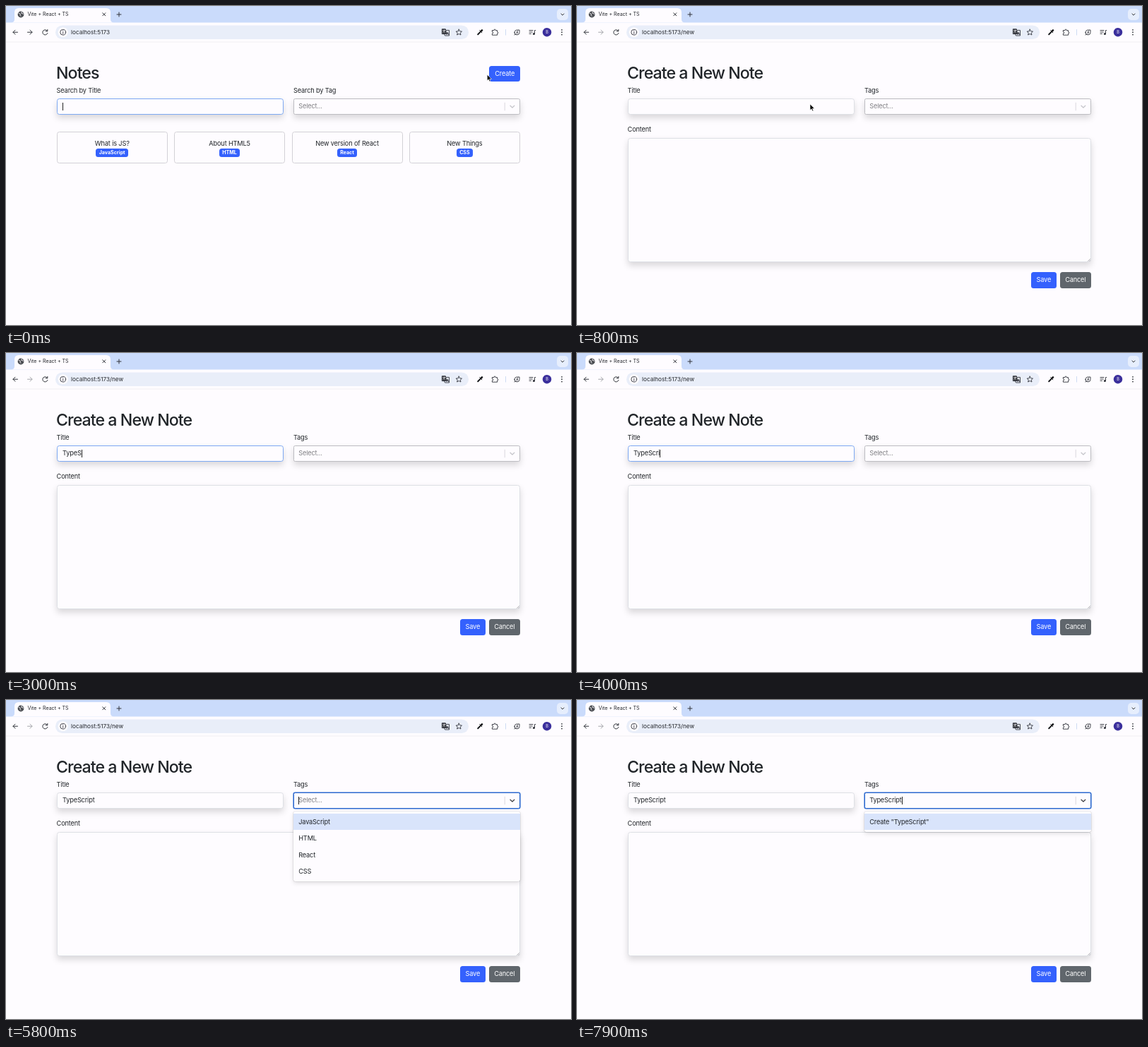
Animation, 800 px wide and 452 px high, one loop 8000 ms. Source, as an HTML page:

```html
<!DOCTYPE html>
<html lang="en">
<head>
<meta charset="utf-8">
<title>Notes</title>
<style>
html, body { margin: 0; width: 100%; height: 100%; overflow: hidden; background: #fefcff; }
body, svg text { font: 9.2px/12px Inter, "Open Sans", sans-serif; font-optical-sizing: none; }
body { color: #212529; letter-spacing: -.155px; }
#stage { position: relative; width: 800px; height: 452px; overflow: hidden; }
#stage > *, .page > * { position: absolute; box-sizing: border-box; }
.page { inset: 0; }
svg text { letter-spacing: 0; }
.t { white-space: pre; }
h1 { margin: 0; left: 71px; top: 80.5px; font-size: 23.2px; line-height: 28px; font-weight: 500; letter-spacing: -.95px; white-space: pre; }
.box { background: #fefcff; border: .6px solid #dee0e5; border-radius: 3.5px; box-shadow: 0 4.7px 9.4px rgba(0,0,0,.15); }
.field { top: 131.3px; height: 22.4px; display: flex; align-items: center; white-space: pre; }
#title { left: 72px; width: 320.8px; padding-left: 7px; }
#title.on { border-color: #7ea9f3; }
#select { left: 407.2px; width: 320.8px; padding-left: 6px; border-color: #bdbdc2; border-radius: 2.4px; }
#select.on { border-color: #2c69cf; box-shadow: 0 0 0 .6px #2c69cf; }
#hint { color: #808084; }
.field i { width: .8px; height: 11px; margin-right: -.8px; background: #222; }
#menu { left: 407.2px; top: 158.2px; width: 320.8px; padding: 2.4px 0; background: #fefcff; border-radius: 2.4px;
  box-shadow: 0 0 0 .6px rgba(0,0,0,.12), 0 2.4px 6.5px rgba(0,0,0,.12); }
#menu div { height: 23.55px; line-height: 23.55px; padding-left: 7px; white-space: pre; }
#menu div:first-child { background: #d9e4fb; }
.btn { height: 22.4px; line-height: 22.4px; border-radius: 3.5px; background: #3461fd; color: #fff; text-align: center; }
.card { top: 177.7px; width: 157px; height: 45px; border: .6px solid #d2d1d6; border-radius: 3.5px; text-align: center; padding-top: 10.5px; }
.card b { display: table; margin: 1px auto 0; padding: 0 4.6px; border-radius: 3.5px; background: #3461fd; color: #fff; font-size: 7.05px; letter-spacing: 0; }
#status { left: -1px; top: 440px; width: 72.5px; height: 13px; padding-left: 4px; background: #cadbfb; border-radius: 0 3px 0 0;
  border: .5px solid #b4c4e2; font-size: 7.05px; letter-spacing: 0; }
</style>
</head>
<body>
<div id="stage">
  <svg width="800" height="452" fill="none" stroke="#30333a" stroke-linecap="round" stroke-linejoin="round">
    <g stroke="none">
      <path fill="#cadbfb" d="M0 0H800V23.5H0Z"/>
      <path fill="#fefcff" d="M7 23.5Q12 23.5 12 18.5V9Q12 3 18 3H142Q148 3 148 9V18.5Q148 23.5 153 23.5Z"/>
      <path fill="#e3e2e7" d="M0 50.7H800V51.3H0Z"/>
      <rect x="70" y="27.5" width="585" height="19.5" rx="9.75" fill="#e9eef9"/>
      <circle cx="80.7" cy="37.2" r="7" fill="#fefcff"/>
      <rect x="780" y="4" width="16" height="16" rx="5" fill="#e6eefd"/>
      <circle cx="21" cy="12" r="4.4" fill="#4a4d52"/>
      <circle cx="766" cy="37.2" r="6.2" fill="#3b2f9c"/>
      <g fill="#30333a">
        <circle cx="787" cy="33.8" r=".9"/><circle cx="787" cy="37.2" r=".9"/><circle cx="787" cy="40.6" r=".9"/>
        <circle cx="80.7" cy="35.1" r=".6"/><circle cx="747.4" cy="39.6" r="1.5"/>
      </g>
      <path fill="#c3d3f0" d="M707.2 33H708V41.5H707.2Z"/>
      <text x="30.5" y="14.4" fill="#24272c" style="font-size:7.05px">Vite + React + TS</text>
      <text id="url" x="92" y="40.2" fill="#24272c" style="font-size:8.2px"></text>
      <text x="766" y="39.3" fill="#fff" text-anchor="middle" style="font-size:5.6px">B</text>
    </g>
    <path stroke="#fefcff" stroke-width=".9" d="M18 10.2l2.4 1.2 -.6 1.6 1.2 1.4M22.2 8.4l-.4 1.8 2.6 1"/>
    <path d="M136.8 9.8l4 4m0-4l-4 4M160 9v6m-3-3h6M785.9 11l2.1 2.1 2.1-2.1"/>
    <path d="M16.5 37.2H10m3-3l-3 3 3 3"/>
    <path id="forward" d="M30.5 37.2H37m-3-3l3 3-3 3"/>
    <path d="M58.5 35.4A3.6 3.6 0 1 0 58.9 38.4M58.8 33.3V35.8H56.3"/>
    <g stroke-width=".9">
      <circle cx="80.7" cy="37.2" r="3.9"/><path d="M80.7 37V39.2"/>
      <path d="M623.2 34.4H627.5V42H621.5L620.5 39.8M624 40.4l1.2-3.4 1.2 3.4m-2-1h1.6"/>
      <path fill="#30333a" d="M617.7 32.7H622.3L623.8 39.6H617.7Z"/>
      <path stroke="#fefcff" stroke-width=".6" d="M618.7 34.6h3.4m-1.7-.8v.8m1.1 0q-.6 2-2.6 2.9m.4-2q.8 1.4 2.2 2"/>
      <path d="M641.3 33.1l1.25 2.7 2.95.3-2.2 2 .65 2.9-2.65-1.5-2.65 1.5.65-2.9-2.2-2 2.95-.3Z"/>
      <path d="M689 34.6h2.1q-.2-1.6 1-1.6t1 1.6H695.6v2.3q1.3 0 1.3 1t-1.3 1V41.2H688.4V39q1.5-.1 1.5-1.1t-1.5-1.1v-2.2Z"/>
      <path d="M720 37.7q0-3.7 4-3.7h3v3.3q0 3.6-3.5 3.6t-3.5-3.2ZM724.6 35.2l-1.7 2.2h1.8l-1.6 2.1M720 41l1-.9"/>
      <path d="M741 34.5h5m-5 2.4h4.2m-4.2 2.4h2.5M748.5 39.5V34.5h1.3"/>
    </g>
    <path stroke="#15171b" stroke-width="2" d="M668.2 40.2L672 36.4"/>
    <path stroke="#15171b" stroke-width="2.6" d="M672.8 35.5L674 34.3"/>
    <path stroke="#15171b" d="M670.6 34.6l3.2 3.2"/>
  </svg>

  <h1 id="heading"></h1>
  <div class="t" id="label1" style="left:71.6px;top:113.6px"></div>
  <div class="t" id="label2" style="left:407px;top:113.6px"></div>

  <div class="page" id="home">
    <div class="btn" style="left:684.4px;top:84.8px;width:43.6px">Create</div>
  </div>
  <div class="page" id="form">
    <div class="t" style="left:71.6px;top:169px">Content</div>
    <div class="box" style="left:72px;top:186.7px;width:656px;height:176.3px"></div>
    <svg width="800" height="452" stroke="#77777c" stroke-width=".6"><path d="M723.3 361.8l3.6-3.6M725.4 361.8l1.5-1.5"/></svg>
    <div class="btn" style="left:642.8px;top:377.3px;width:36px">Save</div>
    <div class="btn" style="left:683.6px;top:377.3px;width:44.4px;background:#60666c">Cancel</div>
  </div>

  <div class="box field" id="title"><span></span><i></i></div>
  <div class="box field" id="select"><span></span><i></i><span id="hint">Select...</span></div>
  <svg width="800" height="452" fill="none" stroke="#cacacf">
    <path stroke-width=".7" d="M706.2 136.8V148.2"/>
    <path id="arrow" stroke-width="1.2" stroke-linecap="round" stroke-linejoin="round" d="M714 141.2l2.9 2.8 2.9-2.8"/>
  </svg>
  <div id="menu"></div>
  <div id="status">localhost:5173/new</div>
  <svg width="800" height="452">
    <path id="cursor" stroke="#fff" stroke-width=".6" d="M0 0V8.6L2 6.8 3.3 9.8 4.7 9.2 3.4 6.3H6.2Z"/>
  </svg>
</div>
<script>
const $ = id => document.getElementById(id);
const WORD = "TypeScript", LOOP = 8000;
const NAVIGATE = 200, FOCUS = 900, OPEN = 5000;

// [time, letters typed so far]
const titleKeys = [[0, 0], [1000, 0], [1700, 1], [1800, 2], [2200, 4], [3000, 5], [3200, 6],
  [3700, 7], [3900, 8], [4100, 9], [4400, 10]];
const tagKeys = [[4800, 0], [5900, 1], [6100, 2], [6300, 3], [6500, 4], [6800, 5],
  [7300, 6], [7500, 7], [7600, 8], [7700, 9], [7900, 10]];
// [time, x, y]; the pointer hides while typing
const moves = [
  [[0, 681.3, 97.2], [200, 707, 94], [300, 710.5, 93.5], [800, 330, 139], [1000, 332, 137], [1300, 337, 117], [1700, 337, 117]],
  [[4400, 337, 118], [4500, 350, 121], [4800, 475, 138.3], [5500, 475, 138.3]]
];

[["What is JS?", "JavaScript"], ["About HTML5", "HTML"], ["New version of React", "React"], ["New Things", "CSS"]]
  .forEach(([name, tag], i) => $("home").insertAdjacentHTML("beforeend",
    `<div class="card" style="left:${71.7 + i * 166.4}px">${name}<b>${tag}</b></div>`));

const show = (el, on) => el.style.visibility = on ? "visible" : "hidden";
const setText = (el, s) => { if (el.textContent !== s) el.textContent = s; };

function typeInto(field, keys, t, focused) {
  const [at, count] = keys.filter(k => k[0] <= t).pop() || [0, 0];
  const typed = WORD.slice(0, count);
  setText(field.querySelector("span"), typed);
  show(field.querySelector("i"), focused && (t - at) % 1000 < 500);
  field.classList.toggle("on", focused);
  return typed;
}

function movePointer(t) {
  const path = moves.find(p => t >= p[0][0] && t < p[p.length - 1][0]);
  show($("cursor"), path);
  if (!path) return;
  const i = path.findIndex(p => p[0] > t), [t0, x0, y0] = path[i - 1], [t1, x1, y1] = path[i];
  const u = (t - t0) / (t1 - t0), k = u * u * (3 - 2 * u);
  $("cursor").setAttribute("transform", `translate(${x0 + (x1 - x0) * k} ${y0 + (y1 - y0) * k})`);
}

function draw() {
  const t = Math.floor((performance.now() + 5) / 100) * 100 % LOOP;
  const form = t >= NAVIGATE, open = t >= OPEN;
  show($("home"), !form);
  show($("form"), form);
  show($("status"), t >= 100 && t < 800);
  setText($("url"), form ? "localhost:5173/new" : "localhost:5173");
  setText($("heading"), form ? "Create a New Note" : "Notes");
  setText($("label1"), form ? "Title" : "Search by Title");
  setText($("label2"), form ? "Tags" : "Search by Tag");
  $("forward").style.stroke = form ? "#a5a6ab" : "#30333a";

  typeInto($("title"), titleKeys, t, !form || t >= FOCUS && !open);
  const tag = typeInto($("select"), tagKeys, t, open);
  $("hint").style.display = tag ? "none" : "";
  $("arrow").style.stroke = open ? "#3c3c40" : "#c4c4c9";

  show($("menu"), open);
  const options = tag ? [`Create "${tag}"`] : ["JavaScript", "HTML", "React", "CSS"];
  $("menu").innerHTML = options.map(o => `<div>${o}</div>`).join("");
  movePointer(t);
  requestAnimationFrame(draw);
}
draw();
</script>
</body>
</html>
```
